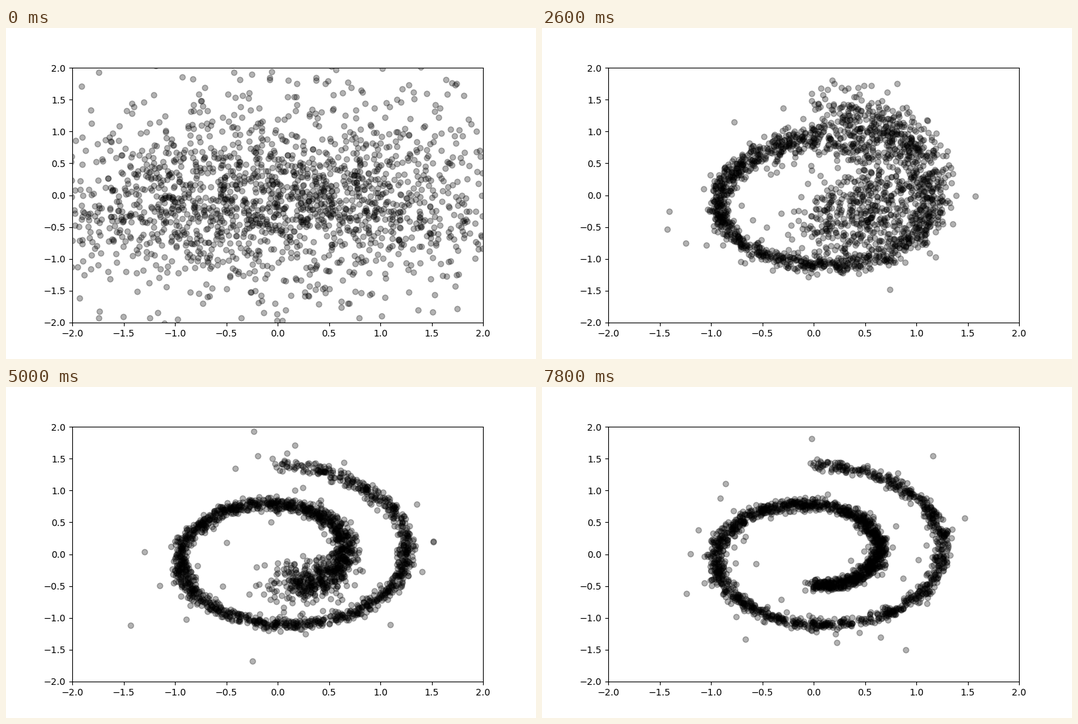
A matplotlib script that plays this animation: 800x500 px, repeating every 8000 ms.

```python
import numpy as np
import matplotlib.pyplot as plt
from matplotlib.animation import FuncAnimation

FRAMES = 40
POINTS = 2000
LINE_WIDTH = .045   # spread of a settled stretch
BLUR = .26          # extra spread of an unsettled one


def unsettled(s, k):
    """1 before the spiral has formed at s, 0 afterwards.

    It forms on the left first, then outwards and, more slowly, inwards.
    """
    arrival = 2 + 15 * np.maximum(3.1 - s, 0) + 11 * np.maximum(s - 3.3, 0)
    return 1 / (1 + np.exp((k - arrival) / 3))


def spiral(k, rng):
    s = 1.5 + 3 * rng.random(POINTS) ** 1.08    # angle in units of pi
    loose = unsettled(s, k)

    # Unsettled parts drift to the middle; the inner arm bulges to the top.
    bulge = .55 * loose * np.exp(-((s - 2.35) / .35) ** 2)
    angle = np.pi * s
    radius = angle / 10 + bulge
    x = radius * np.cos(angle)
    y = radius * np.sin(angle)
    x += .5 * loose * (.5 - x)

    # A few points lie off the line, and some are real strays.
    sigma = LINE_WIDTH + BLUR * loose
    kind = rng.random(POINTS)
    sigma = np.where(kind < .04, sigma + .09, sigma)
    sigma = np.where(kind < .012, .5, sigma)
    return np.column_stack([x, y]) + sigma[:, None] * rng.standard_normal((POINTS, 2))


def cloud(rng):
    height = np.where(rng.random(POINTS) < .3, 1.15, .6)
    x = 1.3 * rng.standard_normal(POINTS)
    y = height * rng.standard_normal(POINTS) - .06
    return np.column_stack([x, y])


def sample(k):
    rng = np.random.default_rng(100 + k)
    blend = np.exp(-k / 2)
    return (1 - blend) * spiral(k, rng) + blend * cloud(rng)


fig, ax = plt.subplots(figsize=(8, 5), dpi=100)
ax.set(xlim=(-2, 2), ylim=(-2, 2))
dots, = ax.plot([], [], "o", color="black", alpha=.3)


def update(k):
    dots.set_data(*sample(k).T)
    return dots,


anim = FuncAnimation(fig, update, frames=FRAMES, interval=200,
                     repeat=True, repeat_delay=0)
plt.show()
```
